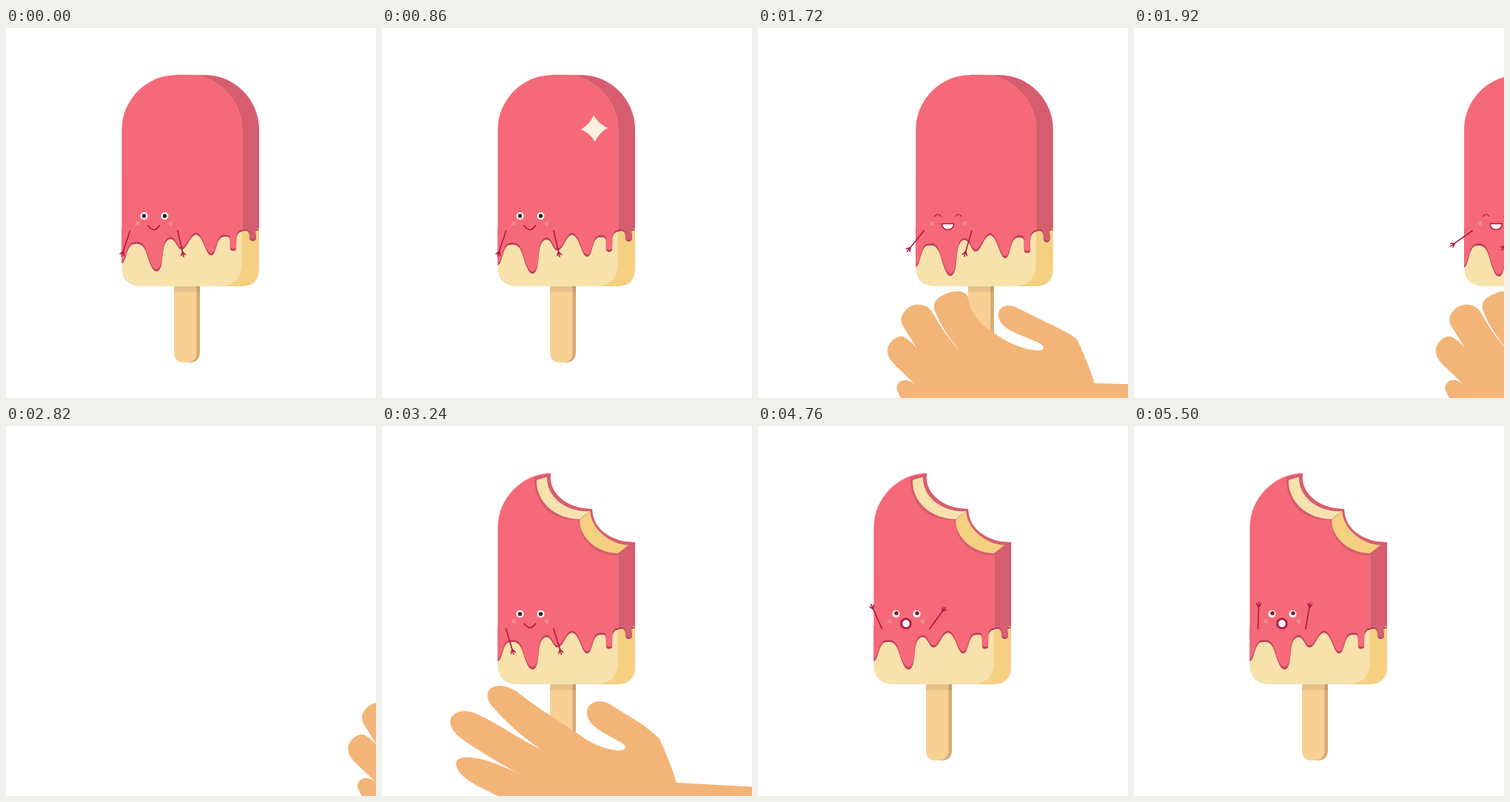
An HTML page for the animation above (5.52 s loop, 500 by 500 pixels).

```html
<!DOCTYPE html>
<html lang="en">
<head>
<meta charset="utf-8">
<title>Ice pop</title>
<style>
  html, body { margin: 0; width: 100%; height: 100%; overflow: hidden; background: #fff; }
  svg { display: block; width: 100vw; height: 100vh; }
  .line { fill: none; stroke: #b0183f; stroke-width: 1.6; stroke-linecap: round; stroke-linejoin: round; }
  .thin { stroke-width: 1.2; }
</style>
</head>
<body>
<svg viewBox="0 0 500 500">
  <defs>
    <path id="frontDrip" d="M156.500 270V316C163 314 163 291 172 290C190 286 189 305 196 319C200 329 207 330 210 318C213 303 211 285 222 283C230 283 231 297 237 297C245 297 248 278 257 277C267 279 270 305 277 305C285 306 283 281 294 280C306 279 302 285 303 296C303 300 311 300 311 296C312 285 309 275 319 273V270Z"/>
    <path id="sideDrip" d="M318.500 270V273C328 270 329 275 329 281C329 287.500 338 287.500 338 281C338 274 334 272 342 271V270Z"/>
    <path id="arm" class="line" d="M0 0V30M0 29L-3 34M0 29V36M0 29L3 34"/>
    <clipPath id="kept">
      <path d="M100 40H228V64C224 90 250 113 284 112C284 140 312 158 342 157H400V500H100Z"/>
    </clipPath>
  </defs>

  <g id="pop">
    <path fill="#f9d093" d="M227 345H262V438Q262 452 248 452H241Q227 452 227 438Z"/>
    <path fill="#d5ab76" d="M257.500 345H262V438Q262 452 246 452Q257.500 450 257.500 438Z"/>
    <path fill="#000" opacity=".07" d="M227 348H262V357H227Z"/>

    <g id="body">
      <path fill="#f5d081" d="M270 200H342V325Q342 349 318 349H270Z"/>
      <path fill="#f7e2ac" d="M156.500 200H319V318Q319 346 292 349H182Q156.500 348 156.500 323Z"/>
      <path fill="#d65d70" d="M230 63.500H269C309 63.500 342 97 342 137V271H230Z"/>
      <g id="drips">
        <use href="#sideDrip" y="2" fill="#b03f5c"/>
        <use href="#frontDrip" y="2.200" fill="#bd3f5b"/>
        <use href="#sideDrip" fill="#d65d70"/>
        <use href="#frontDrip" y="-.4" fill="#f56979"/>
      </g>
      <path fill="#f56979" d="M156.500 273V137C156.500 97 190 63.500 230 63.500H246C286 63.500 319 97 319 137V273Z"/>
      <path fill="none" stroke="#e9a070" stroke-width=".6" opacity=".7" d="M246 63.500C286 63.500 319 97 319 137V273"/>
    </g>

    <g id="bite">
      <path fill="#d65d70" d="M206 69L228 64C224 90 250 113 284 112C284 140 312 158 342 157L319 175C290 176 266 155 266 127C230 129 204 105 206 69Z"/>
      <path fill="#f7e2ac" d="M209 73L223 69C222 95 248 117 281 115L267 126C233 125 208 102 209 73Z"/>
      <path fill="#f5d081" d="M281 115C284 142 310 160 333 161L319 172C292 172 267 152 267 127Z"/>
    </g>

    <g fill="#ef8b8c"><circle cx="178" cy="264" r="3"/><circle cx="222.500" cy="264" r="3"/></g>
    <g id="eyes">
      <g fill="#fff"><circle cx="186.500" cy="254" r="5"/><circle cx="214.500" cy="254" r="5"/></g>
      <g id="pupils" fill="#2f1a26"><circle cx="186.500" cy="254" r="2.700"/><circle cx="214.500" cy="254" r="2.700"/></g>
    </g>
    <path id="smile" class="line" d="M192 267Q200 278 207.500 267"/>
    <g id="happy">
      <path class="line thin" d="M182 254.500Q186.500 249 190.500 254.500M210 254.500Q214 249 218 254.500"/>
      <path class="line" style="fill: #fff" d="M191.500 264.500H208Q207 272.500 199.500 272.500Q192.500 272.500 191.500 264.500Z"/>
    </g>
    <circle id="gasp" r="5.200" fill="#fff" stroke="#b0183f" stroke-width="2.300"/>
    <use id="armL" href="#arm"/>
    <use id="armR" href="#arm"/>
    <path id="spark" fill="#fdf0e0" d="M0-18Q6-6 18 0Q6 6 0 18Q-6 6-18 0Q-6-6 0-18Z"/>
  </g>
  <path id="hand" fill="#f3b478"/>
</svg>
<script>
const LOOP = 5520, AWAY = 2400;
const el = {};
document.querySelectorAll('svg [id]').forEach(n => el[n.id] = n);

// The same outline twice: fingers spread, fingers wrapped round the stick.
const OPEN = `M510 487L398 481Q389 452 375 422Q371 417 350 401L306 374
  C292 366 275 374 277 388C278 400 290 408 300 414L322 426Q331 431 329 434Q326 440 305 435
  C285 430 272 420 262 413C240 398 210 380 190 364C172 349 158 348 150 352C138 358 142 370 150 379
  C165 396 190 420 215 436C190 425 160 403 130 389C112 380 95 384 92 397C92 411 105 420 115 427
  C140 443 170 462 194 473C175 464 150 452 128 448C112 445 100 447 100 455C101 468 115 477 125 483
  C140 491 160 501 185 512C175 508 165 506 155 506C145 506 138 512 140 520L170 540L620 540L620 492Z`;
const SHUT = `M510 483L398 480Q389 452 375 422Q372 417 350 406L295 379
  C281 370 267 377 268 389C270 402 282 408 293 413L322 425Q330 430 329 433Q327 438 308 434
  C288 429 273 420 262 412C243 400 229 385 227 364C224 354 208 354 198 359C182 365 178 374 183 384
  C188 398 202 420 215 435C200 420 188 400 178 383C170 371 152 371 143 381C134 390 136 399 141 406
  C146 413 152 424 158 433C152 426 147 421 141 418C133 413 118 424 118 437C119 447 125 452 133 460
  C147 473 163 489 176 500C165 490 156 480 148 477C138 473 129 480 131 489L155 540L620 540L620 486Z`;
const shutNums = SHUT.match(/\d+/g);

const mix = (a, b, k) => a + (b - a) * k;
const clamp = x => Math.min(1, Math.max(0, x));
const smooth = (a, b, t) => { const x = clamp((t - a) / (b - a)); return x * x * (3 - 2 * x); };
const show = (n, on) => n.style.display = on ? '' : 'none';
const move = (n, x, y, more = '') => n.setAttribute('transform', `translate(${x} ${y}) ${more}`);

function track(t, keys) {
  let v = keys[0][1];
  for (let i = 1; i < keys.length; i++)
    v = mix(v, keys[i][1], smooth(keys[i - 1][0], keys[i][0], t));
  return v;
}

// Sideways carry: speeds up on the way out, slows down on the way back.
function carry(t) {
  const d = t < AWAY ? t - 1600 : 3177 - t;
  return d > 0 ? Math.min(600, 56 * (d / 120) ** 1.67) : 0;
}

function handPath(k) {
  let i = 0;
  return OPEN.replace(/\d+/g, n => mix(+n, +shutNums[i++], k).toFixed(2));
}

const LEFT = [[1580, 18], [1760, 42], [1940, 55], [2400, -50], [2820, -50], [3230, -17], [3460, 26], [3680, 18], [4020, 18], [4420, 160]];
const RIGHT = [[1580, -13], [1760, 20], [1940, 45], [2400, -55], [2820, -55], [3230, -17], [3460, 12], [3680, 5], [4020, 5], [4420, -160]];

function render(t) {
  const bitten = t > 2000, x = carry(t);

  move(el.pop, x, 0);
  show(el.bite, bitten);
  if (bitten) el.body.setAttribute('clip-path', 'url(#kept)');
  else el.body.removeAttribute('clip-path');
  const melt = bitten ? 1 : 1 + 0.107 * t / 1720;
  move(el.drips, 0, 272, `scale(1 ${melt}) translate(0 -272)`);

  const happy = t > 1400 && !bitten, gasp = t > 3600;
  show(el.happy, happy);
  show(el.eyes, !happy);
  show(el.smile, !happy && !gasp);
  show(el.gasp, gasp);
  move(el.gasp, 200, 267, `scale(${smooth(3580, 3720, t) + 0.22 * smooth(4020, 4420, t)})`);
  move(el.pupils, gasp ? 0.5 : 0, gasp ? -1 : 0);
  el.pupils.setAttribute('fill', t > 4300 ? '#7d1834' : '#2f1a26');

  const wave = smooth(4300, 4480, t), phase = (t - 5500) / 320 * 2 * Math.PI + Math.PI / 2;
  const up = lag => 163 + 19 * Math.sin(phase - lag);
  move(el.armL, 167.5, 274, `rotate(${mix(track(t, LEFT), up(0), wave)})`);
  move(el.armR, 232, 274, `rotate(${mix(track(t, RIGHT), -up(1.2), wave)})`);

  const glint = Math.sin(Math.PI * clamp((t - 680) / 380));
  show(el.spark, glint > 0.01);
  move(el.spark, 287, 136, `rotate(${(t - 890) * 0.1}) scale(${glint})`);

  const away = t < AWAY;
  const drop = 155 * (away ? 1 - smooth(1140, 1500, t) : smooth(3220, 3640, t));
  const grip = away ? smooth(1480, 1620, t) : 1 - smooth(3120, 3240, t);
  show(el.hand, t > 1130 && t < 3650 && (t < 2000 || t > 2810));
  move(el.hand, x, drop);
  el.hand.setAttribute('d', handPath(grip));
}

const start = performance.now();
function frame() {
  render((performance.now() - start) % LOOP);
  requestAnimationFrame(frame);
}
frame();
</script>
</body>
</html>
```
